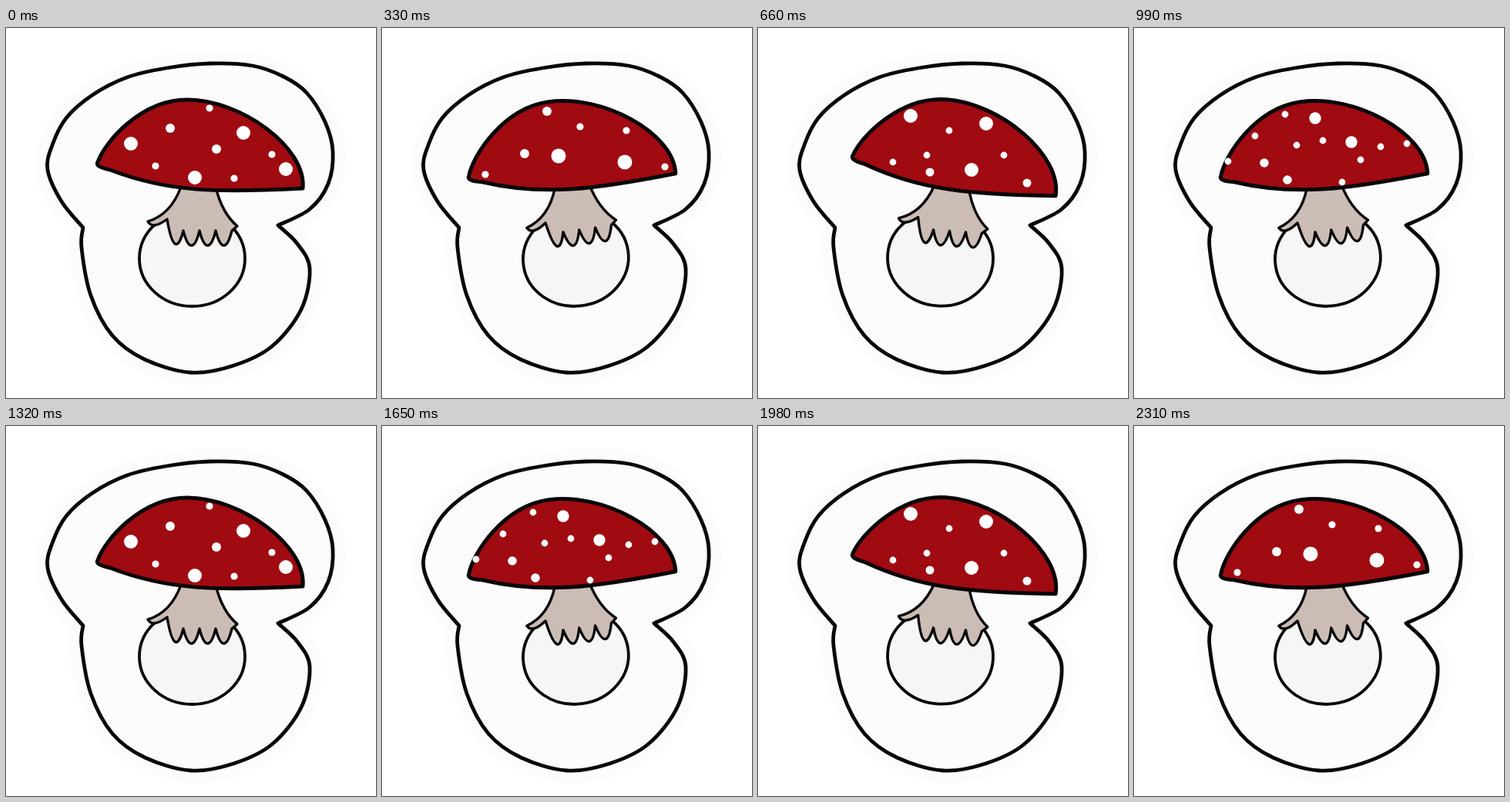
Write an HTML page with a canvas that moves like this. It is 480 by 480 pixels and loops after 2.64 s.

```html
<!DOCTYPE html>
<html lang="en">
<head>
<meta charset="utf-8">
<title>Rocking mushroom</title>
<style>
html, body { margin: 0; width: 100%; height: 100%; overflow: hidden; background: #fff; }
canvas { display: block; width: 480px; height: 480px; }
</style>
</head>
<body>
<canvas id="stage" width="480" height="480"></canvas>
<script>
const ctx = document.getElementById('stage').getContext('2d');
ctx.lineCap = ctx.lineJoin = 'round';

const STEP = 330;
const PIVOT = [245, 228];

const parse = s => s.trim().split(/\s+/).map(p => p.split(',').map(Number));

// Smooth path through "x,y" points; "|" marks a sharp corner.
function curve(text) {
  const path = new Path2D();
  let last;
  for (const part of text.split('|')) {
    const pts = parse(part);
    if (last) pts.unshift(last); else path.moveTo(...pts[0]);
    pts.slice(1).forEach((c, i) => {
      const b = pts[i], a = pts[i - 1] || b, d = pts[i + 2] || c;
      path.bezierCurveTo(
        b[0] + (c[0] - a[0]) / 6, b[1] + (c[1] - a[1]) / 6,
        c[0] - (d[0] - b[0]) / 6, c[1] - (d[1] - b[1]) / 6, ...c);
    });
    last = pts[pts.length - 1];
  }
  return path;
}

const border = curve(`100,259 72,225 54,184 60,152 78,117 112,87 157,64 208,52 265,46 320,49
  360,63 390,84 414,122 424,160 418,202 394,235 353,256 | 378,280 394,312 383,365 345,413
  295,438 240,447 180,430 138,399 110,347 98,285 100,259`);

const cap = new Path2D(`M119,174 C128,148 175,93 235,93 C305,93 390,155 385,208
  C275,214 210,213 135,184 Q115,180 119,174 Z`);

const ball = new Path2D();
ball.ellipse(241.5, 299, 68.5, 62, 0, 0, 7);

// The ragged skirt is a row of equal drips, each ending at x.
const drips = [230, 251, 272, 293].map(x => `C${x - 14},290 ${x - 6},287 ${x},263`);
const stem = new Path2D(`M227,206 Q214,242 184,251 Q190,262 209,248 ${drips.join(' ')}
  L300,257 Q280,240 272,206`);

// tilt in degrees; dots are grouped by radius.
const mid = { tilt: 0, dots: {
  9: '162,150 245,194 308,136 363,183',
  6: '213,130 273,157',
  4.6: '264,104 194,179 296,195 345,164' } };
const left = { tilt: -8, dots: {
  9.5: '229,166 315,174',
  6: '185,163 214,108',
  4.6: '257,128 317,133 367,180 134,190' } };
const right = { tilt: 4, dots: {
  9: '198,114 296,124 277,184',
  5.5: '223,187 349,201',
  4.4: '248,133 219,165 175,174 319,165' } };
const speckled = { tilt: -8, dots: {
  7.7: '235,117 282,148',
  5.8: '169,175 199,197',
  4.4: '196,112 157,140 211,152 245,146 320,154 354,150 294,171 122,173 270,200' } };

const poses = [mid, left, right, speckled, mid, speckled, right, left];

function paint(path, fill, width, stroke = '#080607') {
  ctx.fillStyle = fill;
  ctx.strokeStyle = stroke;
  ctx.lineWidth = width;
  ctx.fill(path);
  ctx.stroke(path);
}

function draw({ tilt, dots }) {
  ctx.fillStyle = '#fff';
  ctx.fillRect(0, 0, 480, 480);
  paint(border, '#fcfcfc', 34, '#fcfcfc');
  paint(border, '#fcfcfc', 4.8);

  ctx.save();
  ctx.translate(...PIVOT);
  ctx.rotate(tilt * Math.PI / 180);
  ctx.translate(-PIVOT[0], -PIVOT[1]);
  paint(ball, '#f6f6f6', 3.8);
  paint(stem, '#cbbdb5', 3.4);
  paint(cap, '#a00a11', 5);
  ctx.restore();

  ctx.fillStyle = '#fff';
  for (const r in dots)
    for (const [x, y] of parse(dots[r])) {
      ctx.beginPath();
      ctx.arc(x, y, r, 0, 7);
      ctx.fill();
    }
}

const start = performance.now();
function tick() {
  const step = Math.floor((performance.now() - start) / STEP);
  draw(poses[step % poses.length]);
  requestAnimationFrame(tick);
}
tick();
</script>
</body>
</html>
```
